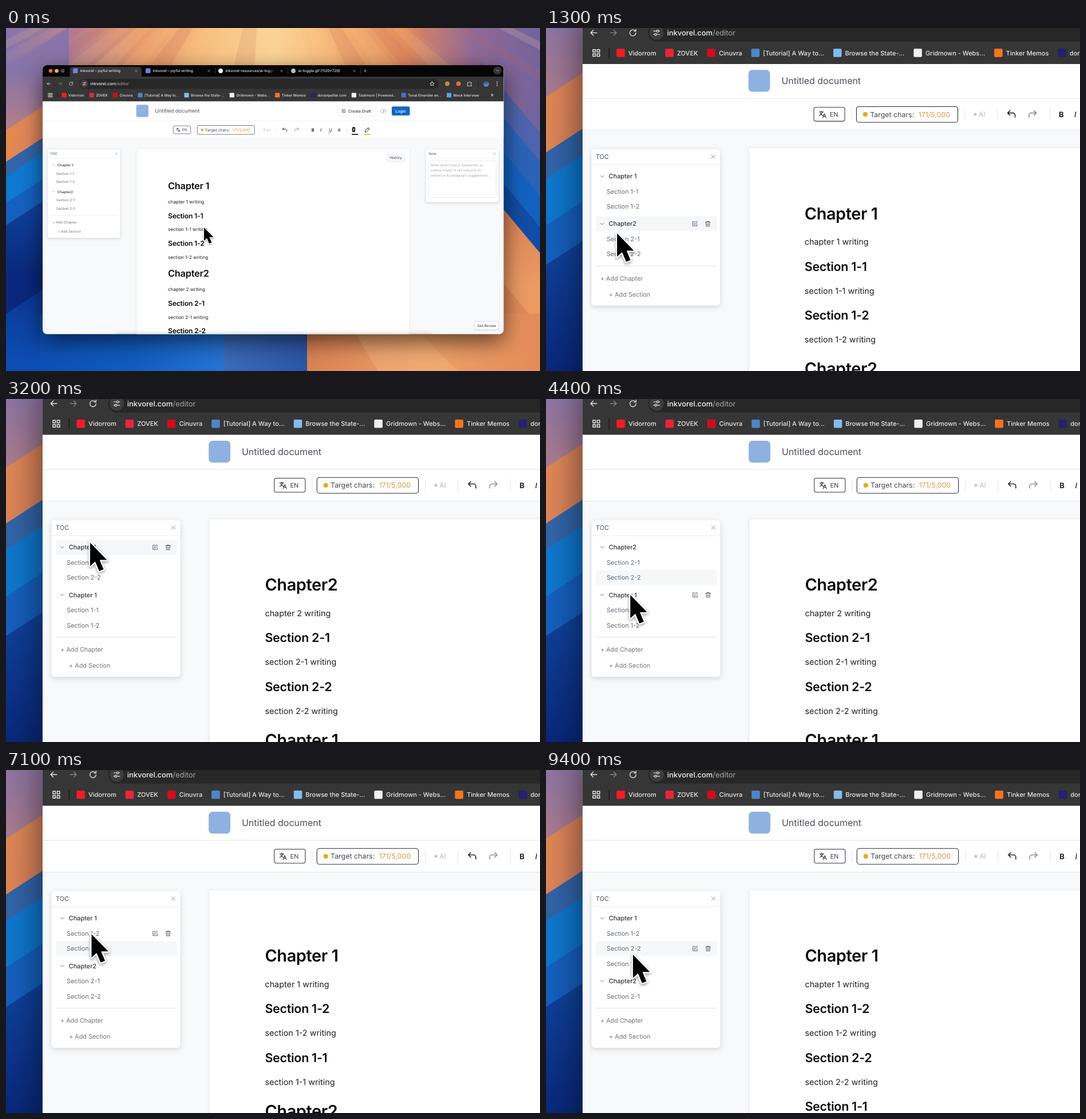
These frames come from a looping animation (933 by 600 pixels, 9500 ms). An HTML page with a canvas:

```html
<!DOCTYPE html>
<html lang="en">
<head>
<meta charset="utf-8">
<title>Outline reordering</title>
<style>
html, body { margin: 0; width: 100%; height: 100%; overflow: hidden; background: #12429c; }
canvas { display: block; width: 933px; height: 600px; }
</style>
</head>
<body>
<canvas id="stage" width="933" height="600"></canvas>
<script>
const ctx = document.getElementById('stage').getContext('2d');
const LOOP = 9500, STEP = 100;
const ZOOM = { x: 64.1, y: 213.4, gain: 0.774, start: 600, rate: 0.011 };
const WIN = { x: 64, y: 65, w: 805.5, h: 470.5, r: 8 };

const TRAVEL = 550;
const ITEMS = ['1', '1-1', '1-2', '2', '2-1', '2-2'];
const DRAGS = [
  { aim: 950, grab: 1900, from: 3, to: 0 },
  { aim: 3400, grab: 4400, from: 3, to: 0 },
  { aim: 5550, grab: 6250, from: 2, to: 1 },
  { aim: 7100, grab: 8400, from: 5, to: 2 }
];

const ICON = {
  close: 'M5 5l14 14M19 5L5 19',
  chevron: 'M6 9l6 6 6-6',
  edit: 'M11 4H4v16h16v-7M18 3l3 3-9 9H9v-3z',
  trash: 'M3 6h18M8 6V3h8v3M5 6l1 15h12l1-15M10 11v6M14 11v6',
  undo: 'M9 14L4 9l5-5M4 9h11a5 5 0 0 1 5 5v4',
  redo: 'M15 14l5-5-5-5M20 9H9a5 5 0 0 0-5 5v4',
  back: 'M20 12H4M11 5l-7 7 7 7',
  forward: 'M4 12h16M13 5l7 7-7 7',
  reload: 'M20 12a8 8 0 1 1-3-6M20 3v5h-5',
  tune: 'M3 7h9M18 7h3M3 17h3M12 17h9M12 7a3 3 0 1 0 6 0a3 3 0 1 0-6 0M6 17a3 3 0 1 0 6 0a3 3 0 1 0-6 0',
  star: 'M12 3l3 6 6 1-5 4 2 6-6-3-6 3 2-6-5-4 6-1z',
  puzzle: 'M4 7h5a3 3 0 1 1 6 0h5v5a3 3 0 1 0 0 6v3H4z',
  cloud: 'M7 18a5 5 0 1 1 1-9a6 6 0 0 1 11 2a4 4 0 0 1-1 7M12 21v-9M9 14l3-3 3 3',
  translate: 'M2 5h12M8 2v3M11 5c-1 5-4 8-9 10M5 8c2 4 5 6 8 7M12 22l5-12 5 12M14 18h6',
  pen: 'M4 20l1-6L16 3l5 5L10 19zM13 6l5 5',
  grid: 'M4 4h6v6H4zM14 4h6v6h-6zM4 14h6v6H4zM14 14h6v6h-6z',
  plus: 'M12 4v16M4 12h16'
};
for (const name in ICON) ICON[name] = new Path2D(ICON[name]);
const arrow = new Path2D('M0 0V23L5 18.5L9 28L13.300 26.300L9.400 17H16.600Z');

// ---- drawing helpers ----

function box(x, y, w, h, r, fill, stroke, line = 0.6) {
  ctx.beginPath();
  ctx.roundRect(x, y, w, h, r);
  if (fill) { ctx.fillStyle = fill; ctx.fill(); }
  if (stroke) { ctx.strokeStyle = stroke; ctx.lineWidth = line; ctx.stroke(); }
}

function dot(x, y, r, fill) {
  box(x - r, y - r, 2 * r, 2 * r, r, fill);
}

// y is the middle of the capitals; returns the right end
function text(str, x, y, size, color, weight = 400, spacing = 0) {
  ctx.font = `${weight} ${size}px Inter, "Liberation Sans", sans-serif`;
  ctx.letterSpacing = spacing + 'px';
  ctx.fillStyle = color;
  ctx.fillText(str, x, y + size * 0.364);
  return x + ctx.measureText(str).width;
}

function icon(name, x, y, size, color, line = 2) {
  ctx.save();
  ctx.translate(x - size / 2, y - size / 2);
  ctx.scale(size / 24, size / 24);
  ctx.strokeStyle = color;
  ctx.lineWidth = line;
  ctx.lineJoin = ctx.lineCap = 'round';
  ctx.stroke(ICON[name]);
  ctx.restore();
}

function withShadow(alpha, blur, dy, scale, paint) {
  ctx.save();
  ctx.shadowColor = `rgba(0,0,0,${alpha})`;
  ctx.shadowBlur = blur * scale;
  ctx.shadowOffsetY = dy * scale;
  paint();
  ctx.restore();
}

function gradient(x0, y0, x1, y1, ...colors) {
  const g = ctx.createLinearGradient(x0, y0, x1, y1);
  colors.forEach((c, i) => g.addColorStop(i / (colors.length - 1), c));
  return g;
}

function poly(fill, ...pts) {
  ctx.beginPath();
  for (let i = 0; i < pts.length; i += 2) ctx.lineTo(pts[i], pts[i + 1]);
  ctx.closePath();
  ctx.fillStyle = fill;
  ctx.fill();
}

function seeded(seed) {
  return () => (seed = seed * 16807 % 2147483647) / 2147483647;
}

// ---- motion ----

function moved(items, { from, to }) {
  const rest = items.slice();
  const size = items[from].length > 1 ? 1
    : items.filter(id => id[0] === items[from][0]).length;
  const block = rest.splice(from, size);
  rest.splice(to, 0, ...block);
  return rest;
}

const isSection = id => id.length > 1;

function rowYs(items) {
  let y = 239.4;
  return items.map((id, i) => i ? y += isSection(id) ? 14.9 : 17.1 : y);
}

const dropTime = drag => drag.grab + TRAVEL + 100;
const itemsAt = t => DRAGS.filter(d => dropTime(d) <= t).reduce(moved, ITEMS);

// Each leg eases from the previous spot to the next one.
const legs = [{ t: 400, x: 112, y: 318 }];
DRAGS.forEach((drag, i) => {
  const ys = rowYs(itemsAt(drag.aim));
  legs.push({ t: drag.aim, x: i ? 111 : 92, y: ys[drag.from] });
  legs.push({ t: drag.grab, x: 110.8 + 1.4 * drag.to, y: ys[drag.to] + 5.3 * drag.to - 4.6 });
});

function pointerAt(t) {
  let x = 346, y = 349;
  for (const leg of legs) {
    const u = Math.min(1, Math.max(0, (t - leg.t) / TRAVEL));
    const ease = u * u * (3 - 2 * u);
    x += (leg.x - x) * ease;
    y += (leg.y - y) * ease;
  }
  return [x, y];
}

// The drawn pointer trails the real one, so hovering looks slightly ahead.
function hoverRow(t, lead) {
  const [x, y] = pointerAt(t + lead);
  if (x > 197) return -1;
  return rowYs(itemsAt(t)).findIndex(row => Math.abs(row - y) < 7.5);
}

// ---- scenery ----

// Slanted stripes; each [y, color] covers everything below its edge.
function stripes(x, w, slope, list) {
  for (const [y, color] of list) poly(color, x, y, x + w, y + slope * w, x + w, 600, x, 600);
}

function wallpaper() {
  box(0, 0, 933, 600, 0, gradient(0, 0, 933, 0,
    '#8474ac', '#b47e90', '#e99a6a', '#f7bf80', '#fbd596', '#f4b274', '#e28b5c', '#8d6a98', '#70639f'));
  const random = seeded(11);
  for (let x = -240; x < 1180; x += 62) {
    const tone = random() < 0.5 ? '255,205,140' : '190,95,95';
    poly(`rgba(${tone},${0.06 + 0.16 * random()})`, 465 + (x - 465) * 0.6, 0, 465 + (x - 425) * 0.6, 0, x + 50, 140, x, 140);
  }
  stripes(0, 110, -0.65, [
    [70, gradient(0, 80, 0, 180, '#8874a8', '#b67f87')],
    [179, gradient(0, 170, 70, 190, '#e68a4e', '#d98360')],
    [234, '#3265a9'], [260, '#0f78cf'], [306, '#1560bf'],
    [345, gradient(0, 280, 0, 430, '#1048a4', '#09287c')],
    [500, gradient(0, 440, 0, 600, '#0a3592', '#0d4fb4')]
  ]);
  stripes(830, 103, 1.2, [
    [60, '#4f64ac'], [110, '#2b62b6'], [170, '#1361bf'], [225, '#114ca6'],
    [270, gradient(0, 300, 0, 450, '#d67d57', '#ec9b62')], [400, '#e18a58']
  ]);
  box(60, 500, 320, 100, 0, gradient(60, 0, 380, 0, '#0d4fb4', '#0f5cc0', '#2474d3'));
  box(380, 500, 146, 100, 0, gradient(380, 0, 526, 0, '#3a6bb7', '#2c55a4'));
  box(526, 500, 407, 100, 0, gradient(526, 0, 933, 0, '#d98252', '#efa368', '#e38b59'));
  poly('#f3b07b88', 590, 500, 690, 500, 790, 600, 650, 600);
}

function tabStrip(light, bar) {
  box(WIN.x, WIN.y, WIN.w, 22, 0, '#060607');
  ['#ff5f57', '#febc2e', '#4b4b4b'].forEach((c, i) => dot(78 + 10.5 * i, 75, 3.3, c));
  box(111.5, 68, 125.5, 20, 5, bar);
  const tabs = ['inkvorel – joyful writing', 'inkvorel – joyful writing', 'inkvorel-resources/ai-toggle', 'ai-toggle.gif (1120×720)'];
  tabs.forEach((label, i) => {
    const x = 121 + i * 127;
    if (i < 2) box(x - 4, 70.5, 8.5, 8.5, 1.5, '#7180d7');
    else dot(x, 75, 4, i === 2 ? '#f4f4f4' : '#b9bdc2');
    text(label, x + 8.5, 75, 6.4, gradient(x + 84, 0, x + 97, 0, light, '#06060700'), 500);
    icon('close', x + 106.5, 75, 6, light);
    if (i) box(x + 117.5, 70, 0.6, 10, 0, '#555');
  });
  icon('plus', 627.5, 75, 7, light);
  dot(858.5, 74.5, 7, '#343434');
  icon('chevron', 858.5, 74.5, 7, light, 2.5);
}

function addressBar(light, bar) {
  const y = 97.6;
  box(WIN.x, 85, WIN.w, 43.5, 0, bar);
  ['back', 'forward', 'reload'].forEach((name, i) => icon(name, 75 + 19.3 * i, y, 9, i === 1 ? '#858585' : light));
  box(128.5, 89, 628, 17.5, 8.7, '#272727');
  dot(137, y, 7, '#3d3d3d');
  icon('tune', 137, y, 8, light);
  const end = text('inkvorel.com', 147.3, y, 7.3, '#f2f2f2', 500);
  text('/editor', end, y, 7.3, '#a8a8a8');
  icon('star', 744.5, y, 10, light);
  dot(771, y, 4, '#c28a39');
  dot(790.5, y, 4, '#e9673d');
  icon('puzzle', 810, y, 10, light);
  box(825, 92, 0.7, 11, 0, '#161616');
  dot(839, y, 5, gradient(0, 92, 0, 103, '#273c66', '#78a5dc'));
  [-3.2, 0, 3.2].forEach(d => dot(858, y + d, 0.9, light));
}

function bookmarks(light) {
  const y = 117.5;
  icon('grid', 77.5, y, 10, light);
  box(89.8, 112.5, 0.7, 10, 0, '#161616');
  const marks = [
    ['Vidorrom', '#f61c26'], ['ZOVEK', '#eb2438'], ['Cinuvra', '#d20d1d'],
    ['[Tutorial] A Way to...', '#4b87c9'], ['Browse the State-...', '#83bce9'],
    ['Gridmown - Webs...', '#f0f0f0'], ['Tinker Memos', '#f47521'], ['dorianpelter.com', '#27206c'],
    ['Taskmurn | Powered...', '#f1f1f1'], ['Tonal Emender an...', '#5866cc'], ['Mock Interview', '#5c9de5']
  ];
  let x = 101.5;
  for (const [label, color] of marks) {
    box(x - 4, y - 4.1, 8.2, 8.2, 1, color);
    x = text(label, x + 7.6, y, 6.2, light, 500) + 13;
  }
  text('»', 846.5, 117, 9, light, 500);
}

function header() {
  box(WIN.x, 128.5, WIN.w, 65.3, 0, '#fff');
  [162.2, 193.5].forEach(y => box(WIN.x, y, WIN.w, 0.6, 0, '#e7e9ed'));
  box(227.6, 134.3, 21.3, 21.5, 3.6, '#8fb1df');
  text('Untitled document', 260.2, 145, 9, '#4b5059');
  box(579.5, 135.5, 67, 19, 2.5, '#fdfdfd', '#eceef1');
  icon('edit', 590, 145.2, 8, '#333');
  text('Create Draft', 598, 145.2, 6.9, '#383c43', 500);
  icon('cloud', 660, 145, 12, '#8b8f96', 1.5);
  box(674, 137.3, 31.5, 15.6, 2.5, '#1267c3');
  text('Login', 680.3, 145.2, 7, '#fff', 500);
}

function toolbar() {
  const y = 178.2, ink = '#222';
  box(292.2, y - 7, 30.5, 13.8, 2, '#fff', '#30343b');
  icon('translate', 300.9, y, 8, '#333');
  text('EN', 307.8, y, 6.2, '#3d424a');
  box(334.2, y - 7.7, 100, 15.6, 2.5, '#fff', '#25282d');
  dot(342.9, y, 2.3, '#e8a91b');
  text('Target chars:', 347.6, y, 7, '#444950');
  text('171/5,000', 395.3, y, 7, '#dc983a');
  [329.2, 440.7, 472.8, 524.7, 594.5].forEach(x => box(x, y - 6, 0.6, 12, 0, '#e2e4e8'));
  dot(451.3, y, 1.5, '#c5c8cd');
  text('AI', 454.8, y, 6.8, '#b8bbc1');
  icon('undo', 487, y, 11, '#26282c');
  icon('redo', 508, y, 11, '#8d9197');
  ['700', 'italic 500', '400', '400'].forEach((weight, i) => text('BIUS'[i], 533.8 + 15.3 * i, y, 7.4, ink, weight));
  box(562.6, y + 3.7, 5.6, 0.6, 0, ink);
  box(578.8, y - 0.3, 6.4, 0.6, 0, ink);
  box(605.2, y - 4.6, 4.6, 8.2, 1.7, ink, ink, 1);
  box(606.9, y - 2.6, 1.2, 4.2, 0.6, '#fff');
  box(604, y + 7, 11, 1.7, 0, '#111');
  icon('pen', 631, y, 11, ink);
  box(626, y + 7, 10.5, 1.7, 0, '#f2b72c');
}

// White card with a title line and a close cross
function card(title, x, w, h, scale) {
  withShadow(0.15, 5, 1.5, scale, () => box(x, 212.6, w, h, 3, '#fff'));
  text(title, x + 4.2, 219.9, 6.1, '#4c5158');
  icon('close', x + w - 6.8, 219.9, 6.3, '#8a8f96');
  box(x, 227.6, w, 0.6, 0, '#eef0f3');
}

function outline(items, t, scale) {
  card('TOC', 72.8, 126.8, 154.4, scale);
  const lit = hoverRow(t, 200), tools = hoverRow(t, 100);
  const ys = rowYs(items);
  if (lit >= 0) box(77, ys[lit] - 7.4, 119.5, 14.8, 2, '#f5f7f9');
  if (tools >= 0) {
    icon('edit', 174.8, ys[tools], 6.4, '#555b63');
    icon('trash', 187.6, ys[tools], 6.4, '#555b63');
  }
  items.forEach((id, i) => {
    if (isSection(id)) return text(titleOf(id), 87.7, ys[i], 6.15, '#656b74');
    icon('chevron', 83.3, ys[i], 6.3, '#6c727b');
    text(titleOf(id), 89.8, ys[i], 6.15, '#30353b', 500);
  });
  box(77, 327.6, 118.5, 0.7, 0, '#e6e8ec');
  text('+ Add Chapter', 81.5, 340, 6.1, '#70767e');
  text('+ Add Section', 90, 355.9, 6.1, '#70767e');
}

function titleOf(id) {
  if (isSection(id)) return 'Section ' + id;
  return id === '1' ? 'Chapter 1' : 'Chapter2';
}

function page(items, scale) {
  withShadow(0.12, 3, 0.4, scale, () => box(228.3, 211.6, 476.5, 400, 1, '#fff'));
  let y = 276;
  items.forEach((id, i) => {
    const section = isSection(id), size = section ? 12.1 : 16.3;
    if (i) y += section ? 24.1 : 28.7;
    text(titleOf(id), 283, y, size, '#0c0c0c', 600, -0.013 * size);
    y += section ? 24.1 : 28.2;
    text(`${section ? 'section' : 'chapter'} ${id} writing`, 283, y, 8.1, '#1c1d1f');
  });
  box(666.3, 220.3, 30, 13.6, 2, '#f8f8f9', '#dadde1');
  text('History', 670.3, 227.1, 6.4, '#373b41');
  withShadow(0.3, 8, 0, scale, () => box(190, WIN.y + WIN.h + 1, 555, 8, 4, '#fff'));
}

function notes(scale) {
  card('Note', 734, 126.3, 92, scale);
  box(737.8, 232.3, 118.6, 64, 2, '#fff', '#d7dae0');
  ['Write down topics, keywords, or', 'outline freely! It will improve AI', 'sentence & paragraph suggestions...']
    .forEach((line, i) => text(line, 741.5, 240.2 + i * 8.7, 6.1, '#a4a8af'));
  withShadow(0.12, 3, 0.7, scale, () => box(818.7, 513.7, 42, 13.8, 2, '#fff', '#d9dce0'));
  text('Get Review', 823.2, 520.6, 6.3, '#343940');
}

// Fast moves are smeared over a short exposure.
function drawPointer(t, scale) {
  const [ax, ay] = pointerAt(t - 9), [bx, by] = pointerAt(t + 9);
  const copies = Math.hypot(bx - ax, by - ay) > 3.5 ? 9 : 1;
  for (let i = 0; i < copies; i++) {
    ctx.save();
    ctx.globalAlpha = copies > 1 ? 0.28 : 1;
    ctx.translate(...pointerAt(copies > 1 ? t + 9 - 18 * i / (copies - 1) : t));
    ctx.lineWidth = 2.6;
    ctx.lineJoin = 'round';
    ctx.strokeStyle = '#fff';
    withShadow(0.4, 3, 1.2, scale, () => ctx.stroke(arrow));
    ctx.fillStyle = '#000';
    ctx.fill(arrow);
    ctx.restore();
  }
}

function draw(t) {
  const w = Math.max(0, t - ZOOM.start) * ZOOM.rate;
  const scale = 1 + ZOOM.gain * (1 - (1 + w) * Math.exp(-w));
  const items = itemsAt(t), light = '#e8e8e8', bar = '#363636';
  ctx.setTransform(scale, 0, 0, scale, ZOOM.x * (1 - scale), ZOOM.y * (1 - scale));
  wallpaper();
  withShadow(0.6, 38, 13, scale, () => box(WIN.x, WIN.y, WIN.w, WIN.h, WIN.r, '#f7f9fb'));
  ctx.save();
  ctx.beginPath();
  ctx.roundRect(WIN.x, WIN.y, WIN.w, WIN.h, WIN.r);
  ctx.clip();
  tabStrip(light, bar);
  addressBar(light, bar);
  bookmarks(light);
  header();
  toolbar();
  page(items, scale);
  outline(items, t, scale);
  notes(scale);
  ctx.restore();
  drawPointer(t, scale);
}

function tick() {
  const t = performance.now() % LOOP;
  draw(Math.floor(t / STEP) * STEP);
  requestAnimationFrame(tick);
}
ctx.textRendering = 'geometricPrecision';
tick();
</script>
</body>
</html>
```
